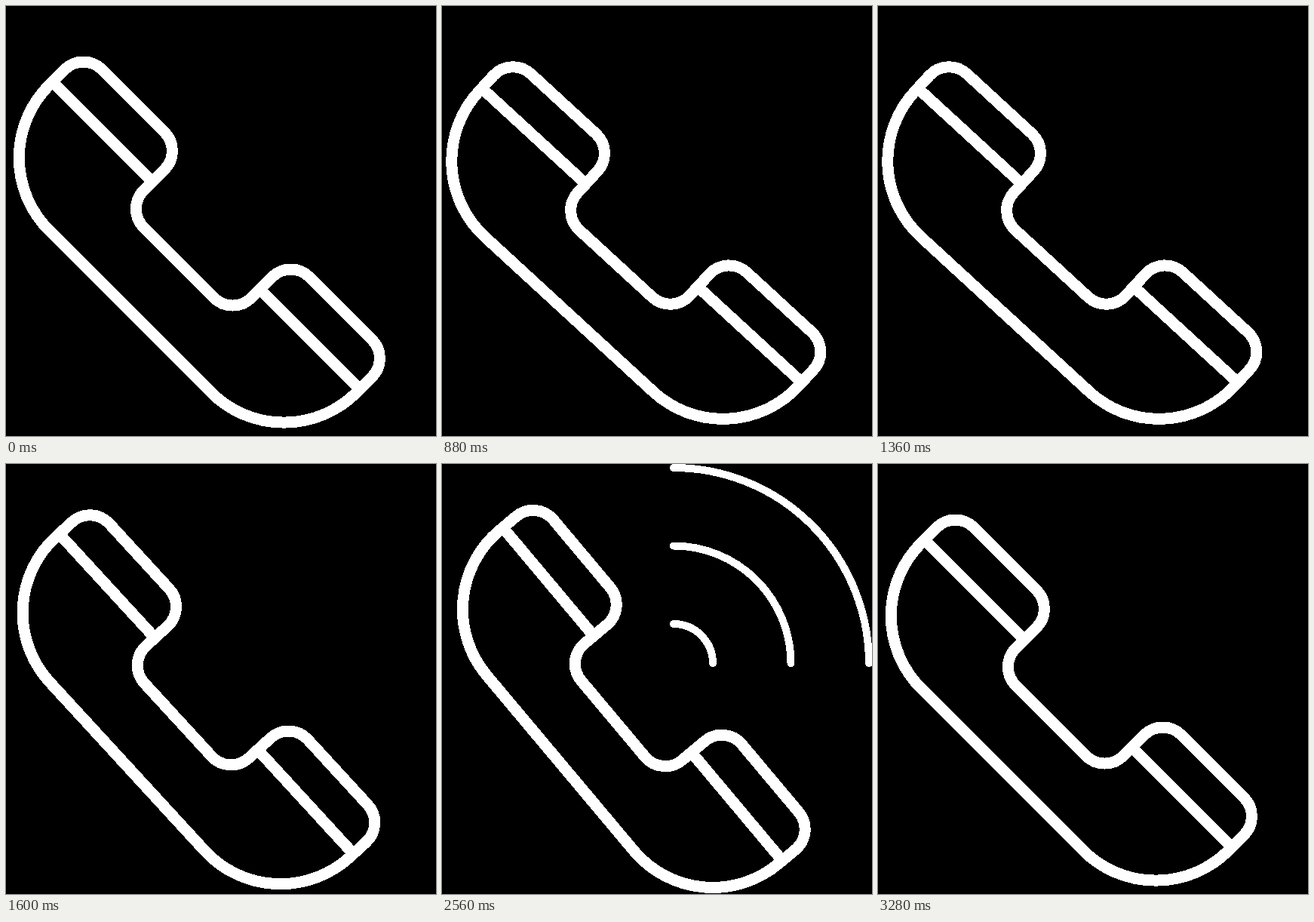
Write an HTML page that moves like this. It is 570 px wide and 570 px high and loops after 3360 ms.

```html
<!DOCTYPE html>
<html lang="en">
<head>
<meta charset="utf-8">
<title>Ringing phone</title>
<style>
  html, body { margin: 0; width: 100%; height: 100%; overflow: hidden; background: #000; }
  svg { display: block; width: 570px; height: 570px; }
  path { fill: none; stroke: #fff; shape-rendering: crispEdges; }
  #phone { stroke-width: 15; }
  #waves { stroke-width: 10; stroke-linecap: round; }
</style>
</head>
<body>
<svg viewBox="0 0 570 570">
  <g id="phone">
    <path id="outline"/>
    <path id="bars"/>
  </g>
  <g id="waves"><path/><path/><path/></g>
</svg>
<script>
const LOOP = 3360, TICK = 80, SWING = 5, SWING_TIME = 240;
const RING = 480, FIRST_PEAK = 560, HOLD = 2000, REST = 3280;
const WAVE_START = 1920, WAVE_TIME = 320, WAVE_GAP = 160;
const PIVOT = [257.2, 312.3], WAVE_CENTRE = [307, 264];
const RADII = [52, 155.5, 259];

const phone = document.getElementById('phone');
const waves = [...document.querySelectorAll('#waves path')];
const clamp = v => Math.max(0, Math.min(1, v));
const ease = x => x * x * (3 - 2 * x);

// The handset lies flat around its pivot; the group turns it by 45 degrees.
function drawPhone() {
  const end = 288.1, inner = 100.8, r = 35, R = 136.4;
  const top = -69.3, grip = 39.6, base = 131, bar = -11.3;
  const arc = (rad, sweep, x, y) => `A${rad} ${rad} 0 0 ${sweep} ${x} ${y}`;
  document.getElementById('outline').setAttribute('d', [
    `M${-end} ${base - R}V${top + r}`, arc(r, 1, -end + r, top),
    `H${-inner - r}`, arc(r, 1, -inner, top + r),
    `V${grip - r}`, arc(r, 0, -inner + r, grip),
    `H${inner - r}`, arc(r, 0, inner, grip - r),
    `V${top + r}`, arc(r, 1, inner + r, top),
    `H${end - r}`, arc(r, 1, end, top + r),
    `V${base - R}`, arc(R, 1, end - R, base),
    `H${-end + R}`, arc(R, 1, -end, base - R), 'Z'
  ].join(''));
  document.getElementById('bars').setAttribute('d',
    `M${-end} ${bar}H${-inner}M${inner} ${bar}H${end}`);
}

// Eased swings from side to side, a pause at full tilt, then one swing home.
function tilt(t) {
  if (t < RING || t >= REST) return 0;
  if (t >= HOLD) return SWING * ease(clamp((REST - t) / SWING_TIME));
  const u = (t - FIRST_PEAK) / SWING_TIME + 2;
  return SWING * (2 * ease(Math.abs(u % 2 - 1)) - 1);
}

// Waves grow outwards one after another and draw back in reverse order.
function waveLength(t, i) {
  const delay = i * WAVE_GAP;
  return Math.min(clamp((t - WAVE_START - delay) / WAVE_TIME),
                  clamp((REST - delay - t) / WAVE_TIME));
}

function wavePath(r, part) {
  if (!part) return '';
  const [x, y] = WAVE_CENTRE, a = part * Math.PI / 2;
  return `M${x} ${y - r}A${r} ${r} 0 0 1 ${x + r * Math.sin(a)} ${y - r * Math.cos(a)}`;
}

function render(now) {
  const t = Math.floor((now % LOOP) / TICK) * TICK;
  phone.setAttribute('transform', `translate(${PIVOT}) rotate(${45 + tilt(t)})`);
  waves.forEach((w, i) => w.setAttribute('d', wavePath(RADII[i], waveLength(t, i))));
}

function frame(now) {
  render(now);
  requestAnimationFrame(frame);
}

drawPhone();
render(0);
requestAnimationFrame(frame);
</script>
</body>
</html>
```
